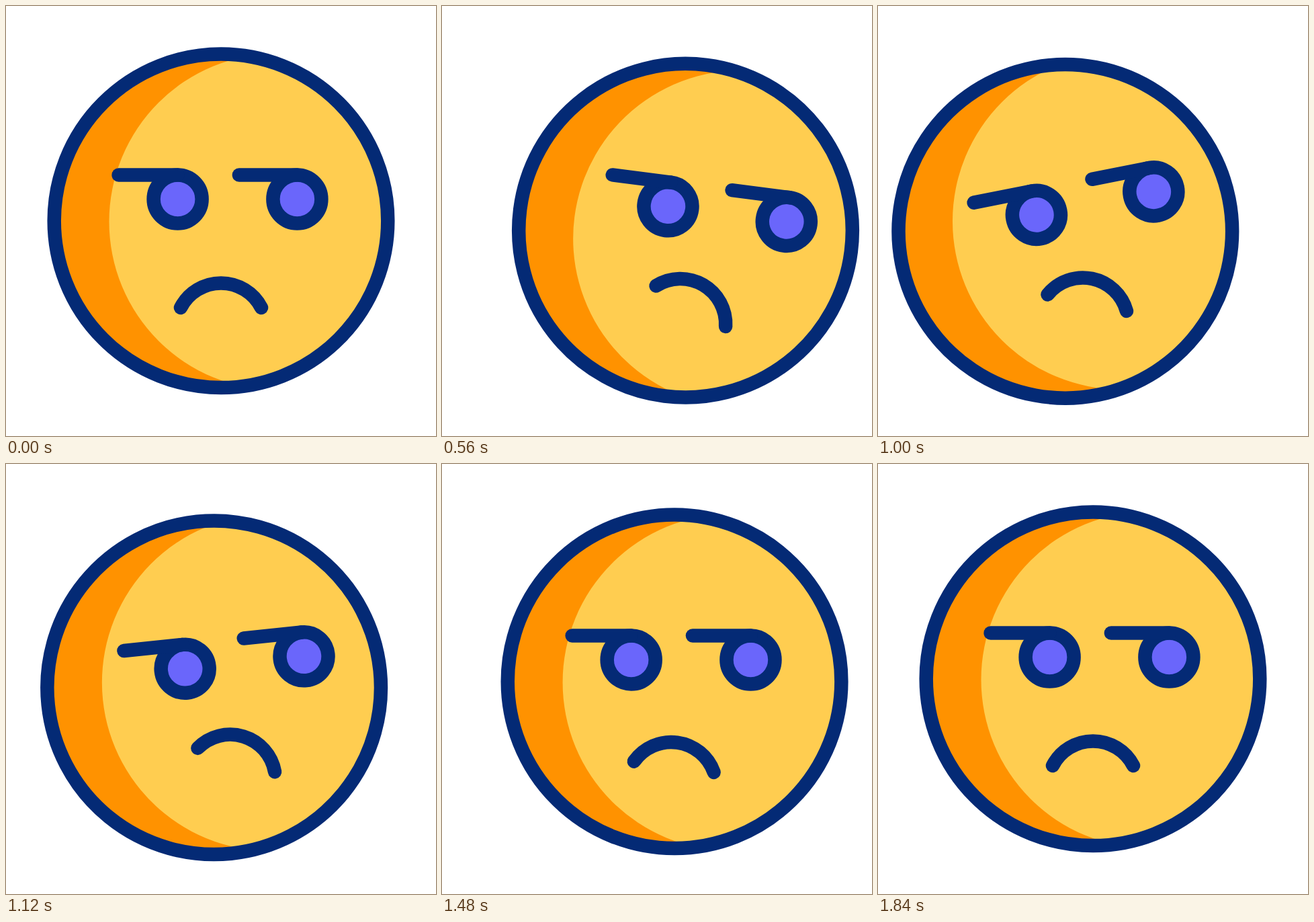
These frames come from a looping animation (640x640 px, 2 s). An HTML page:

```html
<!DOCTYPE html>
<html lang="en">
<head>
<meta charset="utf-8">
<title>Grumpy face</title>
<style>
  html, body { margin: 0; width: 100%; height: 100%; overflow: hidden; background: #fff; }
  svg { display: block; width: 100vw; height: 100vh; }
  .line { fill: none; stroke: #042a75; stroke-width: 20.5; stroke-linecap: round; }
  .pupil { fill: #6a66fb; }
</style>
</head>
<body>
<svg viewBox="0 0 640 640">
  <clipPath id="disc"><circle r="248"/></clipPath>
  <g id="face">
    <circle r="248" fill="#ff9200"/>
    <circle cx="84" cy="1.3" r="250.5" fill="#ffcd50" clip-path="url(#disc)"/>
    <circle class="line" r="248.3"/>
    <g id="eyes">
      <g transform="translate(-64.4 -32.3)">
        <circle class="pupil" r="36"/>
        <circle class="line" r="36"/>
        <path class="line" d="M-88 -36H0"/>
      </g>
      <g transform="translate(113.4 -32.3)">
        <circle class="pupil" r="36"/>
        <circle class="line" r="36"/>
        <path class="line" d="M-86.5 -36H0"/>
      </g>
    </g>
    <path id="mouth" class="line" d="M-60 -31A67.5 67.5 0 0 1 60 -31"/>
  </g>
</svg>
<script>
const LOOP = 2000, STEP = 40;

const [face, eyes, mouth] = ["face", "eyes", "mouth"].map(id => document.getElementById(id));

const place = (el, x, y, angle) =>
  el.setAttribute("transform", `translate(${x} ${y}) rotate(${angle})`);

// Rises from 0 to 1 between two times, easing in and out.
function ease(t, start, end) {
  const u = Math.min(1, Math.max(0, (t - start) / (end - start)));
  return u * u * (3 - 2 * u);
}

// Bends a straight move into an arc.
const bow = s => Math.sin(Math.PI * s);

function pose(t) {
  const move = (start, end) => ease(t, start, end);

  // The head swings right, left, right again, then home.
  const right = move(0, 550), left = move(560, 1005);
  const again = move(1035, 1240), home = move(1240, 1820);
  place(face,
    320 + 42.5 * right - 83.7 * left + 82.7 * again - 41.5 * home,
    319.8 + 14.4 * right + 1.1 * left + 2.5 * bow(left) - 6.9 * again - 8.6 * home - 1.6 * bow(home),
    14 * move(0, 250) - 25.2 * move(335, 1000) + 11.2 * move(1000, 1250));

  // The eyes glance sideways and drift back.
  place(eyes, 34 * move(0, 260) - 11 * move(600, 1280) - 23 * move(1280, 1480), 0, 0);

  // The mouth lifts and twists, sliding against the swing.
  const lift = move(0, 300) - move(1220, 1550);
  const twist = move(0, 366) - move(1166, 1681);
  const slide = 36 * move(0, 240) - 37 * move(240, 740)
    + 27 * move(1000, 1280) - 31 * move(1280, 1480) + 5 * move(1480, 1840);
  place(mouth, slide, 160.2 - 21 * lift, 23 * twist);
}

function draw() {
  pose(Math.floor(performance.now() % LOOP / STEP) * STEP);
  requestAnimationFrame(draw);
}
draw();
</script>
</body>
</html>
```
